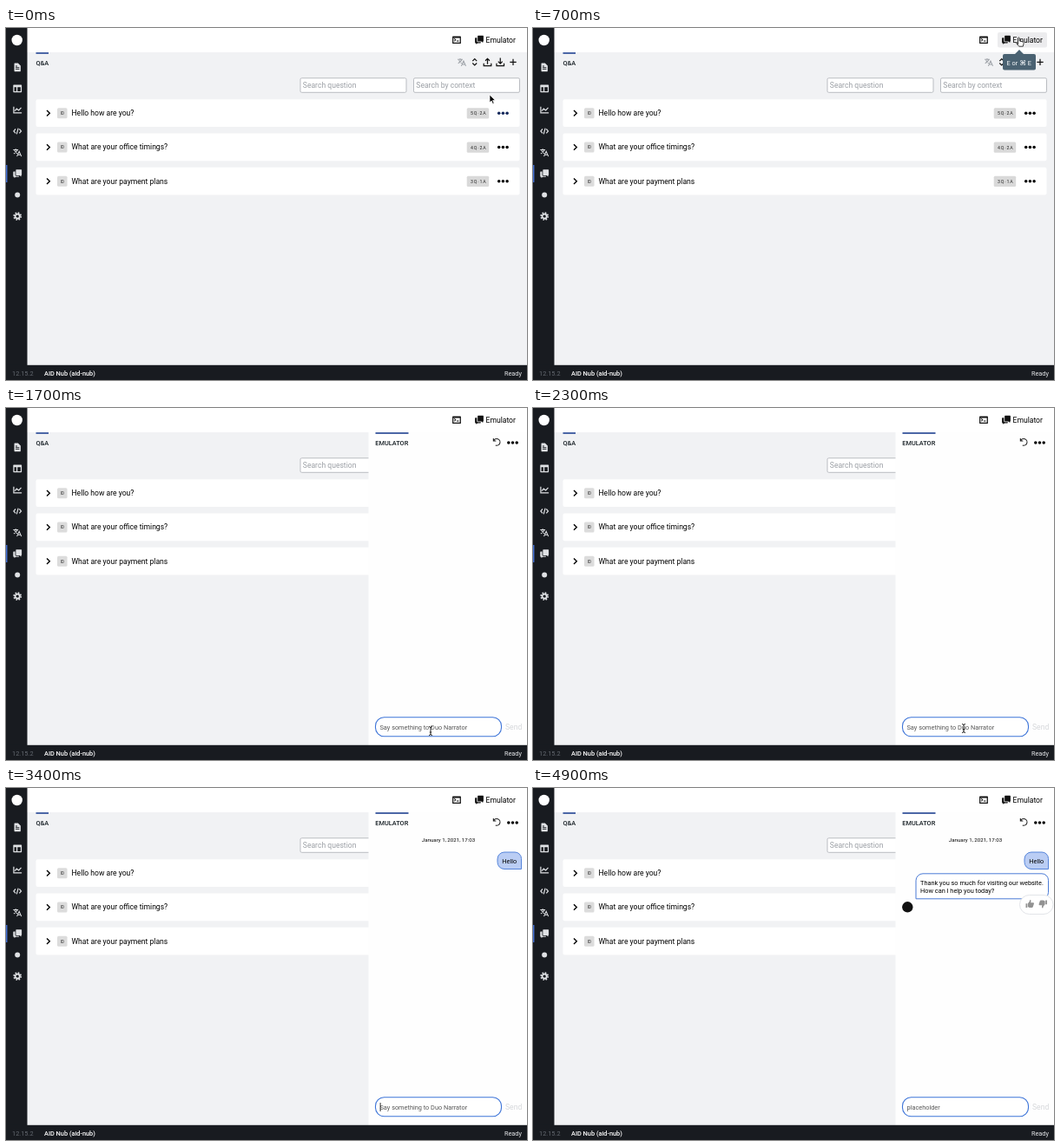
These frames come from a looping animation (600 by 406 pixels, 5 s). An HTML page:

```html
<!DOCTYPE html>
<html lang="en">
<head>
<meta charset="utf-8">
<title>Chat panel demo</title>
<style>
  html, body { margin: 0; width: 600px; height: 406px; overflow: hidden; background: #f1f2f4; }
  svg { display: block; font-family: Roboto, sans-serif; }
  .body { font-size: 8.59px; }
  .small { font-size: 7.36px; }
  .bold { font-weight: 500; }
  .line { fill: none; stroke: currentColor; }
</style>
</head>
<body>
<svg width="600" height="406" viewBox="0 0 600 406">
  <defs>
    <!-- icons on a 16 unit grid -->
    <path id="doc" fill-rule="evenodd" d="M3 0h6l5 5v10a1 1 0 0 1-1 1H3a1 1 0 0 1-1-1V1a1 1 0 0 1 1-1zM4.5 5v1.5h3V5zM4.5 8v1.5h7V8zM4.5 11v1.5h7V11z"/>
    <path id="layout" fill-rule="evenodd" d="M1 1h14a1 1 0 0 1 1 1v12a1 1 0 0 1-1 1H1a1 1 0 0 1-1-1V2a1 1 0 0 1 1-1zM2 5.5V13h4V5.5zM8 5.5V13h6V5.5z"/>
    <path id="chart" class="line" stroke-width="2" d="M1 2v11.5h15M3 10l3.5-4 4 3L15 4"/>
    <path id="code" class="line" stroke-width="2" d="M4.5 4L1 8l3.5 4M11.500 4L15 8l-3.500 4M9.500 2.500l-3 11"/>
    <path id="translate" class="line" stroke-width="1.7" d="M0 3h9.500M4.700 1v2M8 3C7 6.500 4 9 1 10.500M2.500 4.500C4 7.500 6 9 8 10M7 15.500L11.200 6l4.200 9.500M8.500 12.500H14"/>
    <g id="chat">
      <path d="M6 0h9a1 1 0 0 1 1 1v9a1 1 0 0 1-1 1v2.500L12 11H6a1 1 0 0 1-1-1V1a1 1 0 0 1 1-1z"/>
      <path d="M1 4h2.700v6.500A1.800 1.800 0 0 0 5.500 12.300H11V13a1 1 0 0 1-1 1H5l-3 2.200V14H1a1 1 0 0 1-1-1V5a1 1 0 0 1 1-1z"/>
    </g>
    <g id="gear" class="line">
      <circle cx="8" cy="8" r="4.200" stroke-width="3"/>
      <circle cx="8" cy="8" r="6.500" stroke-width="3" stroke-dasharray="2.700 2.405"/>
    </g>
    <path id="console" fill-rule="evenodd" d="M1 1h14a1 1 0 0 1 1 1v12a1 1 0 0 1-1 1H1a1 1 0 0 1-1-1V2a1 1 0 0 1 1-1zM2 4.500V13h12V4.500zM3 6l1-1 3.200 3L4 11l-1-1 2-2zM8 9.500h4V11H8z"/>
    <path id="sort" class="line" stroke-width="2" d="M4 6l4-4 4 4M4 10l4 4 4-4"/>
    <path id="upload" class="line" stroke-width="2" d="M8 12V2M4 5.500L8 1.500l4 4M1 10.500V15h14v-4.500"/>
    <path id="download" class="line" stroke-width="2" d="M8 0v10M4 7l4 4 4-4M1 10.500V15h14v-4.500"/>
    <path id="plus" class="line" stroke-width="2" d="M8 2v12M2 8h12"/>
    <path id="undo" class="line" stroke-width="1.700" d="M2 1v5h5M2.300 5.800A6.300 6.300 0 1 1 6 14"/>
    <path id="thumb" d="M0 7h3v8H0zM4 7l3-3.500L8 0c2-.3 2.700 1.500 1.500 5.500H14c1.500 0 2 1 1.700 2l-1.900 6c-.3 1-1 1.500-2 1.500H7l-3-1.500z"/>
    <g id="more"><circle cx="-4.700" r="1.750"/><circle r="1.750"/><circle cx="4.700" r="1.750"/></g>
  </defs>

  <rect width="600" height="406" fill="#f1f2f4"/>
  <rect x="24" width="576" height="28" fill="#fff"/>
  <g id="page">
    <rect x="34.500" y="28" width="14.500" height="2" fill="#4b66a6"/>
    <text class="small bold" x="34.500" y="42.500" fill="#182026">Q&amp;A</text>
  </g>
  <g id="panel">
    <rect x="417.500" y="28" width="183" height="361" fill="#fefefe"/>
    <rect x="425.500" y="28" width="38" height="2" fill="#4b66a6"/>
    <text class="small bold" x="425.300" y="42.500" fill="#182026">EMULATOR</text>
    <use href="#more" x="583.500" y="40"/>
    <g id="sent">
      <text x="509.500" y="62" font-size="6.130" text-anchor="middle">January 1, 2021, 17:03</text>
      <path d="M574 74h12a7.500 7.500 0 0 1 7.500 7.500V93.500H574a8 8 0 0 1-8-8V82a8 8 0 0 1 8-8z" fill="#bacdf4" stroke="#5584da"/>
      <text class="small" x="571.300" y="86.500">Hello</text>
    </g>
    <g id="reply">
      <path d="M449 98.800h137a7.500 7.500 0 0 1 7.500 7.500v14a7.500 7.500 0 0 1-7.500 7.500H441v-21a8 8 0 0 1 8-8z" fill="#fff" stroke="#4a7bd6"/>
      <text class="small" x="446" y="111.500">Thank you so much for visiting our website.</text>
      <text class="small" x="446" y="120.500">How can I help you today?</text>
      <circle cx="431.300" cy="137.300" r="6.200" fill="#111"/>
      <rect x="560.500" y="123.500" width="38.500" height="22" rx="11" fill="#fff" stroke="#e2e4e8"/>
      <g fill="#929292">
        <use href="#thumb" transform="translate(567.500 129) scale(.6)"/>
        <use href="#thumb" transform="translate(592 138.500) scale(-.6)"/>
      </g>
    </g>
    <rect x="425.500" y="356.800" width="145" height="22" rx="10" fill="#fff" stroke="#3d74d8" stroke-width="1.100"/>
    <text id="entry" class="small" x="430.500" y="370.500"></text>
    <rect id="caret" y="363" width=".8" height="10"/>
    <text id="send" class="body" x="575" y="371.300">Send</text>
  </g>

  <rect width="24.500" height="406" fill="#181b20"/>
  <rect y="388.800" width="600" height="18" fill="#181b20"/>
  <rect y="158" width="1.500" height="20" fill="#426fd0"/>
  <circle cx="12.700" cy="14" r="6.200" fill="#fff"/>
  <circle cx="13.200" cy="192.600" r="3" fill="#dfe1e4"/>
  <g class="small">
    <text x="7" y="400.500" fill="#646970">12.15.2</text>
    <text class="bold" x="44" y="400.500" fill="#fff">AID Nub (aid-nub)</text>
    <text x="594" y="400.500" fill="#e8eaec" text-anchor="end">Ready</text>
  </g>

  <rect id="hover" x="535" y="5" width="57" height="17.500" rx="2" fill="#ececee"/>
  <g id="top"><text class="body" x="552.500" y="16.700">Emulator</text></g>
  <g id="tip">
    <path d="M543 30h12l5-5 5 5h12a2 2 0 0 1 2 2v14.500a2 2 0 0 1-2 2H543a2 2 0 0 1-2-2V32a2 2 0 0 1 2-2z" fill="#4a6272"/>
    <g class="small" fill="#f5f8fa">
      <text x="545.500" y="42.500">E or</text>
      <text x="560.300" y="42.700" font-size="8" font-family="DejaVu Sans, sans-serif">⌘</text>
      <text x="569.700" y="42.500">E</text>
    </g>
  </g>
  <g id="cursor">
    <path id="arrow" d="M0 0v9l2.100-1.900 1.500 3.300 1.500-.7-1.500-3.200h2.800z" stroke="#fff" stroke-width=".7"/>
    <path id="hand" d="M-1.500 4.800V-2.500q.9-1.300 1.800 0V1l4 1q1 .4.800 1.700L4.300 7.200H-.3L-3.500 3.500q0-1.500 2 0z" fill="#fff" stroke="#111" stroke-width=".8"/>
    <path id="beam" d="M-2-4.500Q0-4.500 0-3Q0-4.500 2-4.500M0-3V4M-2 5.500Q0 5.500 0 4Q0 5.500 2 5.500M-1.200 2H1.200" fill="none" stroke="#111" stroke-width=".9"/>
  </g>
</svg>
<script>
const $ = id => document.getElementById(id);
const add = (id, markup) => $(id).insertAdjacentHTML('beforeend', markup);
const icon = (name, x, y, color, size = 9.8) =>
  `<use href="#${name}" fill="${color}" color="${color}" transform="translate(${x - size / 2} ${y - size / 2}) scale(${size / 16})"/>`;

// Page content
[[338.5, 'Search question'], [469, 'Search by context']].forEach(([x, label]) => add('page',
  `<rect x="${x + .5}" y="57.800" width="122" height="16.500" rx="1.500" fill="#fff" stroke="#b9bcc1"/>
   <text class="body" x="${x + 3.3}" y="69.200" fill="#9b9fa5">${label}</text>`));

[['Hello how are you?', '5Q·2A'],
 ['What are your office timings?', '4Q·2A'],
 ['What are your payment plans', '3Q·1A']].forEach(([title, count], i) => add('page',
  `<g transform="translate(0 ${98.3 + i * 39.25})">
     <rect x="34.500" y="-16" width="557" height="31.800" rx="2" fill="#fff"/>
     <path class="line" d="M47-3.200L50.300 0L47 3.200" stroke-width="1.400"/>
     <rect x="59" y="-6" width="11.500" height="12" rx="1.500" fill="#dcdcdc"/>
     <text x="64.800" y="1.800" font-size="5" text-anchor="middle" fill="#333">ID</text>
     <text class="body" x="75.500" y="2.900">${title}</text>
     <rect x="530.700" y="-6" width="25.500" height="12.300" rx="1.500" fill="#d9d9d9"/>
     <text x="535" y="2.100" font-size="5.200" letter-spacing=".9" fill="#222">${count}</text>
     <use id="more${i}" href="#more" x="572.400"/>
   </g>`));

['translate', 'sort', 'upload', 'download', 'plus'].forEach((name, i) =>
  add('page', icon(name, 525 + i * 14.75, 39.3, i ? '#111' : '#9da1a7')));
add('panel', icon('undo', 565, 39.3, '#222'));
add('top', icon('console', 519, 13.7, '#111') + icon('chat', 545, 13.7, '#111'));
['doc', 'layout', 'chart', 'code', 'translate', 'chat', '', 'gear'].forEach((name, i) => {
  if (name) $('hover').insertAdjacentHTML('beforebegin', icon(name, 13.2, 45.3 + i * 24.55, '#dfe1e4'));
});

// Pointer path: time, x, y
const path = [[0, 557, 77], [100, 557, 36], [200, 557, 36], [300, 559, 17], [500, 560, 14],
  [800, 560, 14], [1000, 557, 22], [1100, 548, 80], [1200, 520, 230], [1300, 497, 345],
  [1400, 489, 370], [1500, 489, 372], [1700, 489, 372], [2000, 496, 369], [5000, 496, 369]];
const typing = [[2700, 'H'], [2800, 'He'], [3100, 'Hell'], [3200, 'Hello']];

const clamp = v => Math.max(0, Math.min(1, v));
const show = (id, on) => $(id).setAttribute('opacity', +on);

function pointer(t) {
  const i = path.findIndex(p => p[0] > t);
  const [t0, x0, y0] = path[i - 1], [t1, x1, y1] = path[i];
  const k = (t - t0) / (t1 - t0);
  return [x0 + (x1 - x0) * k, y0 + (y1 - y0) * k];
}

function caretOn(t) {
  if (t < 2700) return Math.floor((t - 800) / 500) % 2 === 0;
  return t < 3900 || (t >= 4500 && t < 4900);
}

function draw(t) {
  const [x, y] = pointer(t);
  $('cursor').setAttribute('transform', `translate(${x} ${y})`);
  show('cursor', t < 2700);
  show('hand', t >= 300 && t < 900);
  show('beam', t >= 1400);
  show('arrow', t < 300 || (t >= 900 && t < 1400));

  $('more0').setAttribute('fill', t < 100 ? '#12275a' : '#000');
  show('hover', t >= 300 && t < 1100);
  show('tip', t < 1100 ? clamp((t - 300) / 300) : clamp((1300 - t) / 300));
  show('panel', t >= 800);
  show('sent', t >= 3400);
  show('reply', clamp((t - 3600) / 500));

  const active = t >= 2700 && t < 3400;
  const typed = active ? typing.filter(s => s[0] <= t).pop()[1] : '';
  const entry = $('entry');
  entry.textContent = typed || (t < 3700 ? 'Say something to Duo Narrator' : 'placeholder');
  entry.setAttribute('fill', active ? '#111' : '#555');
  $('caret').setAttribute('x', 430.7 + (typed ? entry.getComputedTextLength() : 0));
  show('caret', caretOn(t));
  $('send').setAttribute('fill', active ? '#111' : '#d5d7da');
}

const start = performance.now();
function tick() {
  const t = (performance.now() - start) % 5000;
  draw(Math.floor(t / 100) * 100);
  requestAnimationFrame(tick);
}
tick();
</script>
</body>
</html>
```
